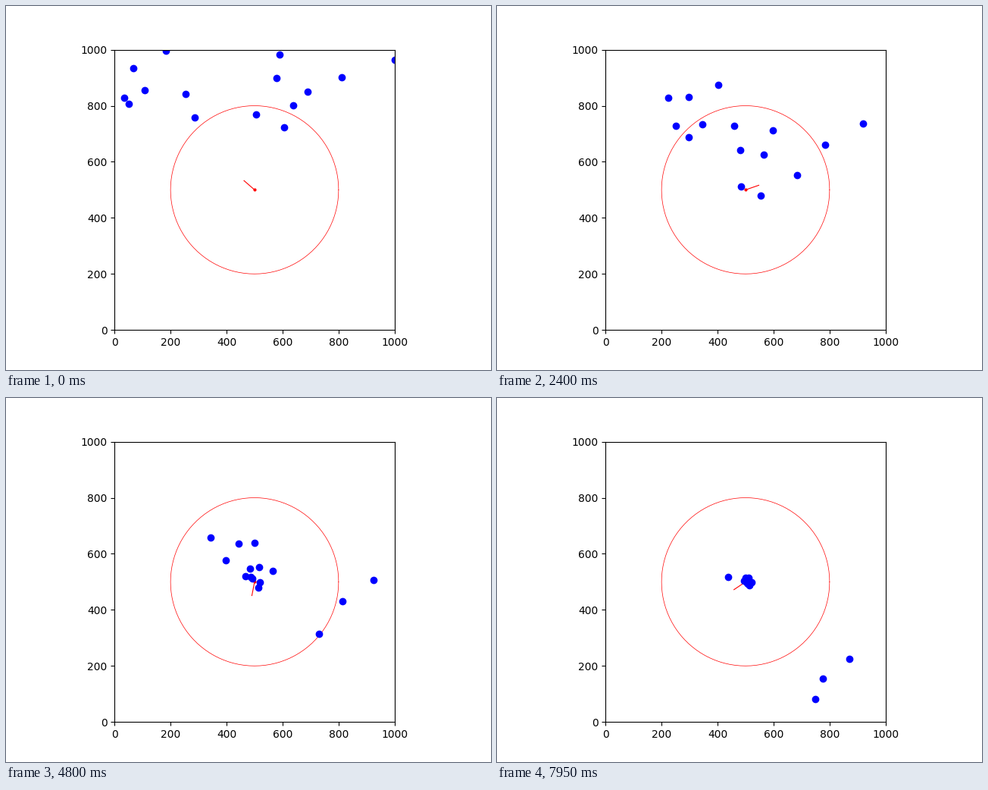
A matplotlib script for the animation above (8000 ms loop, 640 by 480 pixels).

```python
import numpy as np
import matplotlib.pyplot as plt
from matplotlib.animation import FuncAnimation

LOOP_MS, TICK_MS, STEP_MS = 8000, 50, 150
SIZE, CENTRE, RADIUS, NEEDLE = 1000, 500, 300, 50
GATHER = 28  # step at which the flocks start to close into a swarm

# Flocks in stage pixels: shared heading per step, then (start, gather point) per dot.
flocks = [
    ((6, 1.1), [((168, 82), (301, 175)), ((211, 59), (334, 173)),
                ((156, 121), (275, 210)), ((162, 129), (316, 242)),
                ((183, 111), (325, 227)), ((237, 116), (343, 223)),
                ((249, 147), (345, 255))]),
    ((-1, 9), [((330, 143), (327, 244)), ((367, 160), (330, 247))]),
    ((0, 6.6), [((357, 95), (342, 265)), ((361, 64), (371, 231))]),
]
start = np.array([s for _, dots in flocks for s, _ in dots], float)
gather = np.array([g for _, dots in flocks for _, g in dots], float)
heading = np.array([h for h, dots in flocks for _ in dots], float)

# Dots that keep away from the swarm; the first enters by wrapping round.
LONER_STEPS = np.array([0, 12, GATHER, 37, 46, 53])
loners = np.array([
    [(143, 71), (207, 105), (267, 173), (270, 195), (275, 214), (305, 236)],
    [(379, 131), (393, 201), (405, 289), (424, 340), (433, 395), (420, 397)],
    [(398, 113), (429, 163), (438, 249), (450, 292), (449, 344), (430, 370)],
    [(443, 94), (478, 136), (484, 221), (486, 264), (486, 315), (465, 344)],
], float)
loner_speed = np.gradient(loners, LONER_STEPS, axis=1, edge_order=2)


def flock_at(step):
    """Leave along the heading, bend to the gather point, then close in."""
    if step <= GATHER:
        bend = gather - start - heading * GATHER
        return start + heading * step + bend * (step / GATHER) ** 2
    middle = np.array([317, 222])
    spread = 0.06 + 0.94 * np.exp(-0.12 * (step - GATHER))
    drift = np.array([13, 20]) * np.interp(step, [37, 46, 53], [0, 0.82, 1])
    return middle + drift + (gather - middle) * spread


def loners_at(step):
    """Smooth cubic through the key points."""
    i = min(np.searchsorted(LONER_STEPS, step, side="right"), len(LONER_STEPS) - 1) - 1
    h = LONER_STEPS[i + 1] - LONER_STEPS[i]
    u = (step - LONER_STEPS[i]) / h
    return ((1 + 2 * u) * (1 - u) ** 2 * loners[:, i]
            + u * (1 - u) ** 2 * h * loner_speed[:, i]
            + u ** 2 * (3 - 2 * u) * loners[:, i + 1]
            - u ** 2 * (1 - u) * h * loner_speed[:, i + 1])


fig, ax = plt.subplots(figsize=(6.4, 4.8), dpi=100)
ax.set_aspect("equal")
ax.set(xlim=(0, SIZE), ylim=(0, SIZE))

turn = np.linspace(0, 2 * np.pi, 201)
ax.plot(CENTRE + RADIUS * np.cos(turn), CENTRE + RADIUS * np.sin(turn), "r", lw=0.5)
ax.plot(CENTRE, CENTRE, "ro", ms=2)
needle, = ax.plot([], [], "r", lw=0.8)
dots, = ax.plot([], [], "bo", ms=6)


def update(frame):
    step = frame * TICK_MS // STEP_MS
    angle = np.radians(139 + 15 * step)
    needle.set_data([CENTRE, CENTRE + NEEDLE * np.cos(angle)],
                    [CENTRE, CENTRE + NEEDLE * np.sin(angle)])
    x, y = np.vstack([flock_at(step), loners_at(step)]).T
    dots.set_data((x - 143.2) / 0.3696 % SIZE, (427.2 - y) / 0.3696)
    return needle, dots


anim = FuncAnimation(fig, update, frames=LOOP_MS // TICK_MS, interval=TICK_MS,
                     repeat=True, repeat_delay=0)
plt.show()
```
